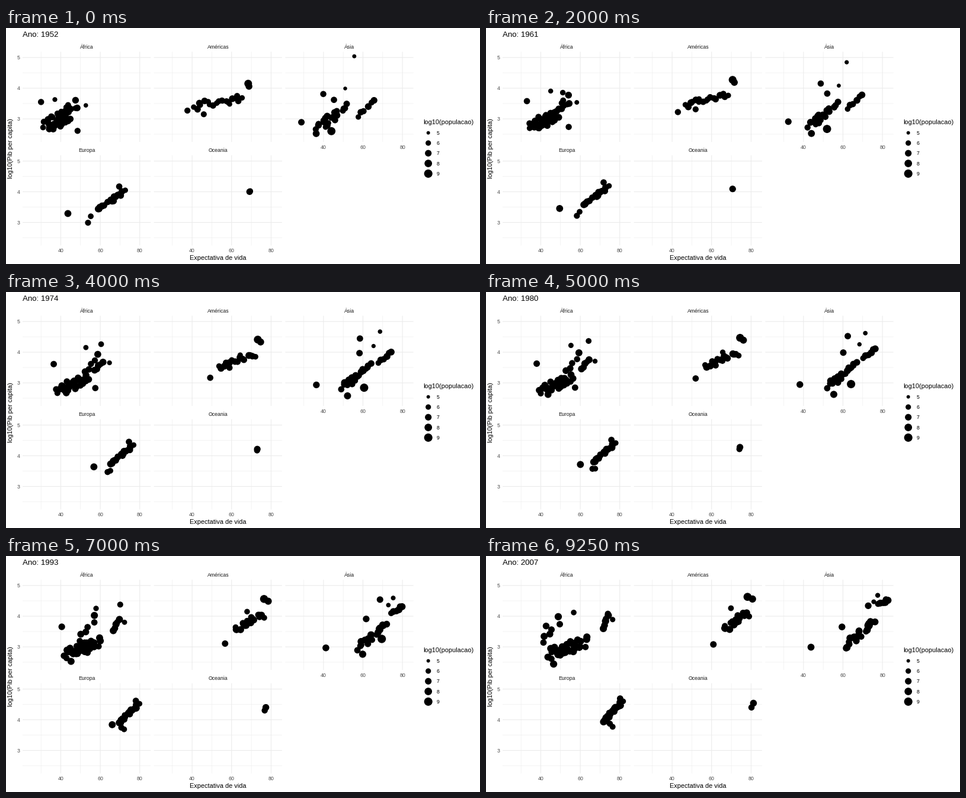
A matplotlib script for the animation above (10000 ms loop, 800x400 px).

```python
import numpy as np
import matplotlib.pyplot as plt
from matplotlib.animation import FuncAnimation
from matplotlib.collections import LineCollection

plt.rcParams["font.family"] = "Liberation Sans"

W, H, DPI = 800, 400, 72
FRAMES, INTERVAL, HOLD, STEPS = 40, 250, 2, 35
PANEL_W, PITCH_X, PITCH_Y = 216.2, 221.7, 175.5
LEFT, TOP = 28, 40.2
X_MIN, X_MAX, Y_MIN, Y_MAX = 20.649, 85.553, 2.2486, 5.1888
SX, SY = PANEL_W / (X_MAX - X_MIN), 52
GREY = "#4D4D4D"

rng = np.random.default_rng(11)


def solo(x0, y0, x1, y1, pop, lift_x=0, lift_y=0):
    """One path from start to end; the lift bows it at mid time."""
    return np.array([[x0, y0, x1, y1, pop, lift_x, lift_y]])


def crowd(n, a, b, c, d, spread, lift=(0, 0)):
    """Paths that start scattered along a-b and end along c-d."""
    t = np.linspace(0, 1, n)[:, None]
    start = np.array(a) + t * np.subtract(b, a)
    end = np.array(c) + t * np.subtract(d, c)
    noise = rng.uniform(-1, 1, (n, 4)) * (spread * 2)
    pop = rng.uniform(6, 7.3, (n, 1))
    return np.hstack([np.hstack([start, end]) + noise, pop, np.tile(lift, (n, 1))])


AFRICA = np.vstack([
    crowd(35, (32.5, 2.72), (44, 3.17), (45, 2.8), (62, 3.17), (2, 0.2)),
    crowd(5, (42, 3.2), (49, 3.35), (71.3, 3.62), (73.7, 4), (0.8, 0.06)),
    crowd(6, (41, 2.9), (46, 3.6), (41, 3.15), (50, 4), (1.5, 0.1), (11, 0.15)),
    solo(30, 3.55, 42.7, 3.68, 6.6),
    solo(52.7, 3.44, 76.4, 3.89, 5.4),
    solo(42.7, 3.38, 74, 4.08, 6, 2, 0.57),
    solo(37, 3.63, 56.7, 4.12, 5.6, 6, 0.3),
    solo(48.5, 2.61, 43.5, 2.67, 6.5, 12, 0.2),
    solo(39, 2.89, 46.5, 2.44, 7.1),
])
AMERICAS = np.vstack([
    crowd(20, (40, 3.4), (65.5, 3.72), (67, 3.62), (78.5, 4.08), (1.5, 0.13)),
    solo(68.4, 4.15, 78.2, 4.63, 8.2),
    solo(68.8, 4.06, 80.7, 4.56, 7.2),
    solo(37.6, 3.27, 60.9, 3.08, 6.5),
    solo(45.9, 3.15, 72.2, 3.78, 6.4),
    solo(59, 3.48, 69.8, 4.26, 5.8),
])
ASIA = np.vstack([
    crowd(20, (36.5, 2.72), (51, 3.35), (62, 3.1), (75, 3.85), (1.8, 0.16)),
    crowd(6, (57.5, 3.06), (65.3, 3.61), (78, 4.4), (82.6, 4.55), (0.7, 0.06)),
    solo(55.6, 5.04, 77.6, 4.68, 5.2, 2, -0.22),
    solo(51, 3.99, 75.6, 4.47, 5.1, 2, 0),
    solo(28.8, 2.89, 43.8, 2.99, 6.9),
    solo(36.3, 2.52, 62, 2.98, 7.3, 3, -0.15),
    solo(39.9, 3.81, 72.8, 4.34, 6.6, 2, 0.42),
    solo(45.3, 3.62, 59.5, 3.65, 6.7, 6, 0.35),
    solo(44, 2.6, 73, 3.7, 8.75, 2, -0.25),
])
EUROPE = np.vstack([
    crowd(26, (59, 3.45), (72.3, 3.99), (72.2, 4), (81, 4.57), (0.8, 0.06)),
    solo(43.6, 3.29, 71.8, 3.93, 7.35),
    solo(53.8, 2.99, 75, 3.87, 6.45),
    solo(55.2, 3.2, 76.4, 3.77, 6.2),
    solo(69.6, 4.17, 80.2, 4.69, 6.7),
])
OCEANIA = np.vstack([
    solo(69.1, 4, 81.2, 4.54, 6.9),
    solo(69.4, 4.02, 80.2, 4.4, 6.3),
])

# name, column, row, paths, bend x, bend y, population growth
REGIONS = [
    ("África", 0, 0, AFRICA, 0.11, 0.08, 0.55),
    ("Américas", 1, 0, AMERICAS, 0.1, 0.15, 0.45),
    ("Ásia", 2, 0, ASIA, 0.11, 0.04, 0.45),
    ("Europa", 0, 1, EUROPE, 0.07, 0.15, 0.12),
    ("Oceania", 1, 1, OCEANIA, -0.08, 0, 0.35),
]


def to_px(x, y, col, row):
    return (LEFT + col * PITCH_X + (np.asarray(x) - X_MIN) * SX,
            TOP + row * PITCH_Y + (Y_MAX - np.asarray(y)) * SY)


def diameter(logpop):
    share = np.clip((np.asarray(logpop) - 4.778) / 4.342, 0, 1)
    size = 1 + 5 * np.sqrt(share)
    return 0.75 * (size * 2.845 + 0.945) + 0.71


def dots(step):
    u = step / STEPS
    bow = 4 * u * (1 - u)
    pts, sizes = [], []
    for _, col, row, paths, bend_x, bend_y, grow in REGIONS:
        x0, y0, x1, y1, pop, lift_x, lift_y = paths.T
        x = x0 + (x1 - x0) * (u + bend_x * bow) + lift_x * bow
        y = y0 + (y1 - y0) * (u + bend_y * bow) + lift_y * bow
        pts.append(np.column_stack(to_px(x, y, col, row)))
        sizes.append(diameter(pop + grow * u) ** 2)
    return np.vstack(pts), np.concatenate(sizes)


fig = plt.figure(figsize=(W / DPI, H / DPI), dpi=DPI, facecolor="white")
ax = fig.add_axes([0, 0, 1, 1])
ax.set(xlim=(0, W), ylim=(H, 0))
ax.axis("off")


def label(x, y, text, size=8.8, color="black", ha="center", va="baseline", **kw):
    return ax.text(x, y, text, fontsize=size, color=color, ha=ha, va=va, **kw)


def grid(col, row, xs, ys, width):
    lines = [np.column_stack(to_px([x, x], [Y_MIN, Y_MAX], col, row)) for x in xs]
    lines += [np.column_stack(to_px([X_MIN, X_MAX], [y, y], col, row)) for y in ys]
    ax.add_collection(LineCollection(lines, colors="#EBEBEB", linewidths=width,
                                     capstyle="butt", snap=False, zorder=1))


X_TICKS, Y_TICKS = np.array([40, 60, 80]), np.array([3, 4, 5])
for name, col, row, *_ in REGIONS:
    grid(col, row, X_TICKS - 10, Y_TICKS - 0.5, 0.55)
    grid(col, row, X_TICKS, Y_TICKS, 1.07)
    label(LEFT + col * PITCH_X + PANEL_W / 2, TOP + row * PITCH_Y - 5.4, name,
          color="#1A1A1A")
    if row == 1 or col == 2:
        for v in X_TICKS:
            x, y = to_px(v, Y_MIN, col, row)
            label(x, y + 11.5, v, color=GREY)
    if col == 0:
        for v in Y_TICKS:
            label(23.2, to_px(0, v, 0, row)[1] + 3.2, v, color=GREY, ha="right")

title = label(28, 14.6, "", 13.2, ha="left")
label(357.8, 392.8, "Expectativa de vida", 11)
label(13.4, 204.5, "log10(Pib per capita)", 11, va="center", ha="right", rotation=90)

label(704, 163, "log10(populacao)", 11, ha="left")
levels = np.arange(5, 10)
rows = 177.7 + 17.28 * (levels - 5)
ax.scatter(np.full(5, 712.7), rows, s=diameter(levels) ** 2, c="black", linewidths=0, snap=False)
for v, y in zip(levels, rows):
    label(726.8, y + 3.2, v, ha="left")

cloud = ax.scatter([], [], c="black", linewidths=0, snap=False, zorder=3)


def draw(frame):
    step = min(max(frame - HOLD, 0), STEPS)
    pts, sizes = dots(step)
    cloud.set_offsets(pts)
    cloud.set_sizes(sizes, DPI)
    title.set_text(f"Ano: {round(1952 + 55 * step / STEPS)}")
    return cloud, title


anim = FuncAnimation(fig, draw, frames=FRAMES, init_func=lambda: draw(0),
                     interval=INTERVAL, repeat=True, repeat_delay=0)
plt.show()
```
